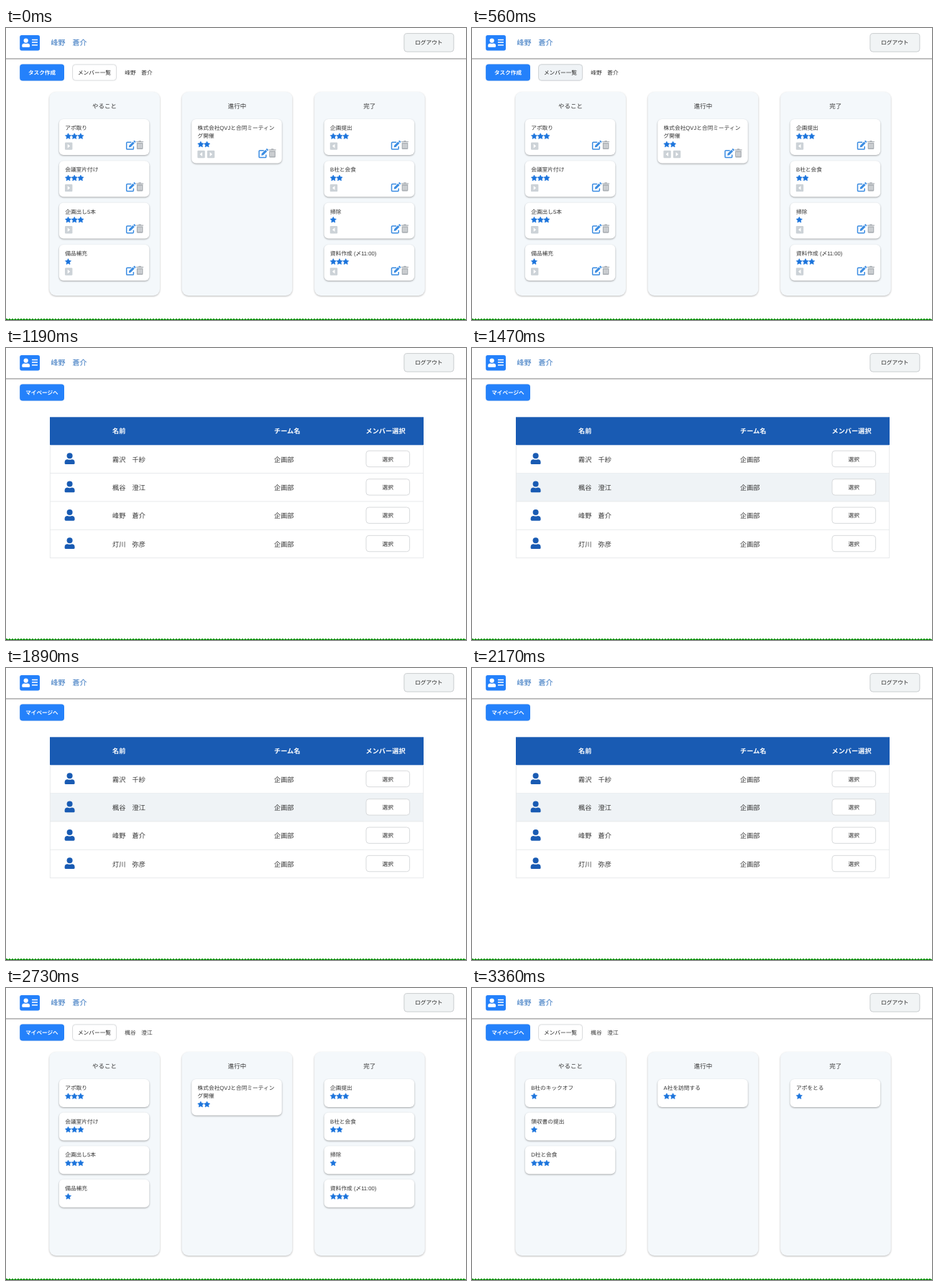
An HTML page that plays this animation: 640x407 px, repeating every 3.78 s.

```html
<!DOCTYPE html>
<html lang="ja">
<head>
<meta charset="utf-8">
<title>タスクボード</title>
<style>
  html, body { margin: 0; width: 100%; height: 100%; overflow: hidden; background: #fff; }
  svg { display: block; width: 640px; height: 407px; }
  text { font-family: "Liberation Sans", "Noto Sans CJK JP", sans-serif; text-rendering: geometricPrecision; }
  .column { fill: #f4f8fb; filter: drop-shadow(.8px 1px .8px #0004); }
  .card { fill: #fff; filter: drop-shadow(.8px 1px .8px #0005); }
  .primary { fill: #2481fb; filter: drop-shadow(0 .5px .5px #0003); }
</style>
</head>
<body>
<svg id="stage" viewBox="0 0 640 407" xmlns="http://www.w3.org/2000/svg"></svg>
<script>
const LOOP = 3780;
const USER = '峰野　蒼介', COLLEAGUE = '楓谷　澄江';
const MEMBERS = ['霧沢　千紗', COLLEAGUE, USER, '灯川　弥彦'];
const HOVER = '#eff3f6';

// Each task: title lines separated by "|", then its number of stars.
const MY_TASKS = [
  [['アポ取り', 3], ['会議室片付け', 3], ['企画出し5本', 3], ['備品補充', 1]],
  [['株式会社QVJと合同ミーティン|グ開催', 2]],
  [['企画提出', 3], ['B社と会食', 2], ['掃除', 1], ['資料作成 (〆11:00)', 3]]
];
const COLLEAGUE_TASKS = [
  [['B社のキックオフ', 1], ['領収書の提出', 1], ['D社と会食', 3]],
  [['A社を訪問する', 2]],
  [['アポをとる', 1]]
];

const rect = (x, y, w, h, r, attrs) =>
  `<rect x="${x}" y="${y}" width="${w}" height="${h}" rx="${r}" ${attrs}/>`;
const path = (d, attrs) => `<path d="${d}" ${attrs}/>`;
const at = (x, y, content) => `<g transform="translate(${x} ${y})">${content}</g>`;
const group = (id, content) => `<g id="${id}">${content}</g>`;

// y is the vertical middle of the glyphs
const text = (s, x, y, size = 7.7, { fill = '#333', weight = 400, anchor = 'start' } = {}) =>
  `<text x="${x}" y="${y + size * .37}" font-size="${size}" fill="${fill}" font-weight="${weight}" text-anchor="${anchor}">${s}</text>`;

const outlined = (x, y, w, h, fill = '#fff', stroke = '#d4d6d8') =>
  rect(x, y, w, h, 4, `fill="${fill}" stroke="${stroke}" stroke-width=".9"`);
const centered = { anchor: 'middle', weight: 500, fill: '#222' };

const starPoints = Array.from({ length: 10 }, (_, i) => {
  const r = i % 2 ? 2.2 : 4.3, a = i * Math.PI / 5;
  return `${(r * Math.sin(a)).toFixed(2)},${(-r * Math.cos(a)).toFixed(2)}`;
}).join(' ');
const star = (x, y) => at(x, y,
  `<polygon points="${starPoints}" fill="#1c74dc" stroke="#1c74dc" stroke-width=".6" stroke-linejoin="round"/>`);

const person = (x, y, scale, fill) => `<g transform="translate(${x} ${y}) scale(${scale})" fill="${fill}">
  <circle cy="4" r="4"/>${path('M-7 14.2V13.2Q-7 9 -2.8 9Q0 10.2 2.8 9Q7 9 7 13.2V14.2Q7 15.8 5.4 15.8H-5.4Q-7 15.8 -7 14.2Z', '')}</g>`;

const arrow = (x, y, dir) => at(x, y,
  rect(-5.2, -5.2, 10.4, 10.4, 1.2, 'fill="#ccd2d7"') +
  path(`M${-1.5 * dir} -2.9L${2 * dir} 0L${-1.5 * dir} 2.9Z`, 'fill="#fff"'));

const editIcon = (x, y) => at(x, y,
  path('M7.5 2.6H1.9Q.8 2.6 .8 3.7V11.3Q.8 12.4 1.9 12.4H9.4Q10.5 12.4 10.5 11.3V8.4', 'fill="none" stroke="#3c8de2" stroke-width="1.5"') +
  path('M4 9.6L4.4 7L9.7 1.7L11.9 3.9L6.6 9.2ZM10.3 1.1L11.2 .2Q11.7 -.2 12.2 .2L13.4 1.4Q13.8 1.9 13.4 2.4L12.5 3.3Z', 'fill="#3c8de2"'));

const trashIcon = (x, y) => at(x, y,
  path('M0 1.2H3L3.6 .2H6.4L7 1.2H10V2.4H0ZM.7 3.1H9.3V11.3Q9.3 12.4 8.2 12.4H1.8Q.7 12.4 .7 11.3Z', 'fill="#aaafb4"') +
  path('M2.9 4.6V10.8M5 4.6V10.8M7.1 4.6V10.8', 'stroke="#fff" stroke-width=".8"'));

function card(x, y, [title, stars], column, editable) {
  const lines = title.split('|');
  const extra = (lines.length - 1) * 11.4;
  const height = (editable ? 50 : 39) + extra;
  let out = rect(x, y, 125.5, height, 6, 'class="card"');
  lines.forEach((line, i) => out += text(line, x + 8.3, y + 12.2 + i * 11.4));
  for (let i = 0; i < stars; i++) out += star(x + 12.6 + i * 8.7, y + 24 + extra);
  if (editable) {
    const bottom = y + height;
    const arrows = [[1], [-1, 1], [-1]][column];
    arrows.forEach((dir, i) => out += arrow(x + 13.3 + i * 13.5, bottom - 12.4, dir));
    out += editIcon(x + 93, bottom - 20.3) + trashIcon(x + 107.3, bottom - 20.3);
  }
  return out;
}

const columns = (tasks, editable) => ['やること', '進行中', '完了'].map((name, c) => {
  const x = 60.3 + c * 184.4;
  return rect(x, 89, 153.7, 284, 9, 'class="column"') +
    text(name, x + 76.7, 109, 8.5, { anchor: 'middle' }) +
    tasks[c].map((task, i) =>
      card(x + 13.6, 127 + i * (editable ? 58.3 : 46.6), task, c, editable)).join('');
}).join('');

const primaryButton = label =>
  rect(19.2, 50.4, 61.8, 23, 4, 'class="primary"') +
  text(label, 50, 62, 7.6, { anchor: 'middle', weight: 700, fill: '#fff' });

const boardNav = (action, owner, hoverId) =>
  primaryButton(action) + outlined(92.6, 50.9, 61, 22.2) +
  group(hoverId, outlined(92.6, 50.9, 61, 22.2, HOVER, '#cfd2d5')) +
  text('メンバー一覧', 123, 62, 7.7, centered) + text(owner, 165.3, 62);

function memberRow(name, i) {
  const top = 135.2 + i * 39.35, middle = top + 19.5;
  const selected = name === COLLEAGUE;
  return (selected ? group('rowHover', rect(61.5, top, 519, 39.3, 0, `fill="${HOVER}"`)) : '') +
    rect(61, top + 38.9, 520, .9, 0, 'fill="#e6e8ea"') +
    person(88.6, middle - 8.5, 1, '#195bb3') +
    text(name, 148, middle + .4, 9.2) + text('企画部', 373, middle + .4, 9.2) +
    outlined(501, middle - 11.4, 60.6, 22.4) +
    (selected ? group('selectHover', outlined(501, middle - 11.4, 60.6, 22.4, HOVER, '#cfd2d5')) : '') +
    text('選択', 531.3, middle, 7.7, centered);
}

const heading = { weight: 700, fill: '#fff' };
const memberList = primaryButton('マイページへ') +
  rect(61, 96.3, 520, 39, 0, 'fill="#195bb3"') +
  text('名前', 148, 116, 9.2, heading) + text('チーム名', 373, 116, 9.2, heading) +
  text('メンバー選択', 500.5, 116, 9.2, heading) +
  MEMBERS.map(memberRow).join('') +
  path('M61.4 135V292.6M580.6 135V292.6', 'stroke="#e6e8ea" stroke-width=".9"');

const header =
  rect(0, 42, 640, 1.7, 0, 'fill="#b4b4b4"') +
  rect(19.2, 10, 27.8, 21.4, 2.6, 'fill="#2481fb"') +
  person(27.7, 14.4, .78, '#fff') +
  path('M36 16.4H44M36 20.1H44M36 23.8H44', 'stroke="#fff" stroke-width="1.5"') +
  text(USER, 62.5, 20.5, 10, { fill: '#2e70bd' }) +
  outlined(553.9, 7.6, 69, 25.5, '#f1f4f5', '#c6c9cb') +
  text('ログアウト', 588.3, 20.5, 7.7, centered);

const footerLine =
  path('M0 405.5H640', 'stroke="#0a9a0a" stroke-dasharray="2 2"') +
  path('M0 406.5H640', 'stroke="#0a8a0a"');

const pages = {
  myPage: boardNav('タスク作成', USER, 'membersHover') + columns(MY_TASKS, true),
  memberPage: memberList,
  colleaguePage: boardNav('マイページへ', COLLEAGUE, 'idleHover') +
    group('staleTasks', columns(MY_TASKS, false)) +
    group('loadedTasks', columns(COLLEAGUE_TASKS, false))
};

document.getElementById('stage').innerHTML = header +
  Object.entries(pages).map(([id, content]) => group(id, content)).join('') + footerLine;

const show = (id, visible) =>
  document.getElementById(id).style.display = visible ? '' : 'none';
const fadeIn = (id, t, start) =>
  document.getElementById(id).style.opacity = t < start ? 0 : t < start + 70 ? .5 : 1;

function draw() {
  const t = performance.now() % LOOP;
  show('myPage', t < 770);
  show('memberPage', t >= 770 && t < 2730);
  show('colleaguePage', t >= 2730);
  show('staleTasks', t < 2800);
  show('loadedTasks', t >= 2800);
  show('idleHover', false);
  show('rowHover', t >= 1470);
  fadeIn('membersHover', t, 490);
  fadeIn('selectHover', t, 2380);
  requestAnimationFrame(draw);
}
draw();
</script>
</body>
</html>
```
